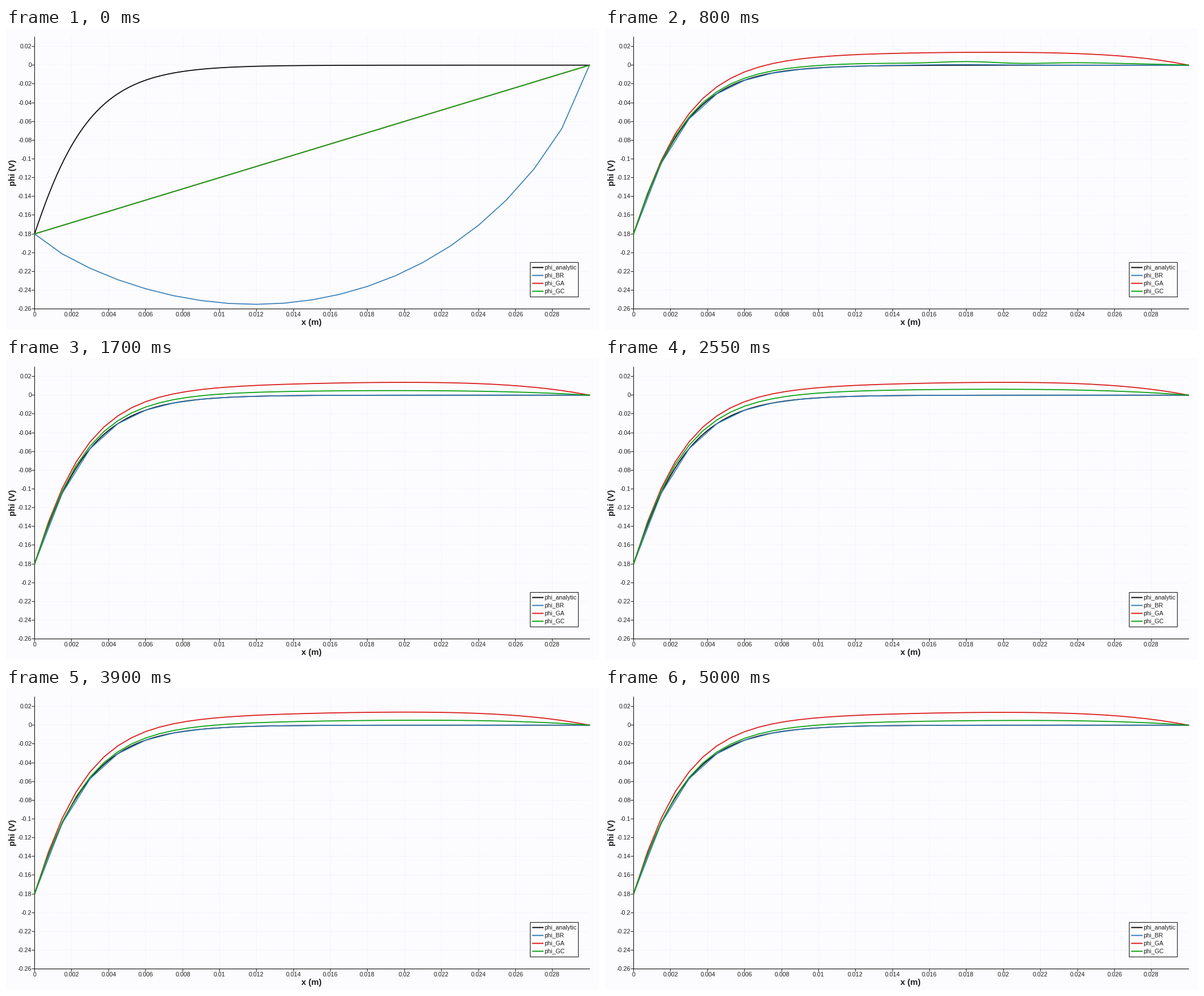
Recreate the animation shown at these times as a matplotlib script. Size 1048 px wide and 534 px high, loop 5050 ms.

```python
import numpy as np
import matplotlib.pyplot as plt
from matplotlib.animation import FuncAnimation
from matplotlib.patches import Rectangle

W, H, DPI = 1048, 534, 100
FRAMES, STEP = 101, 50
PT = 72 / DPI  # points per pixel
LENGTH, WALL = 0.03, -0.18
BLACK, BLUE, RED, GREEN = "#0c0c10", "#377eb8", "#dc1c1c", "#0aa314"
INK, GRID = "#1c1c1c", "#eaeaf9"

plt.rcParams["font.family"] = "Liberation Sans"
fig = plt.figure(figsize=(W / DPI, H / DPI), dpi=DPI, facecolor="#fcfcfe")
ax = fig.add_axes([0, 0, 1, 1])
ax.set(xlim=(0, W), ylim=(H, 0))
ax.axis("off")


def px(x):
    return 50.5 + x * 32690


def py(phi):
    return 65.7 - phi * 1657.7


def line(xs, ys, color=INK, width=1.0, **kw):
    return ax.plot(xs, ys, color=color, lw=width * PT, snap=False, **kw)[0]


def label(x, y, s, size=10.8, **kw):
    ax.text(x, y, s, fontsize=size * PT, color=INK, **kw)


def tick_text(v):
    return f"{v:.3f}".rstrip("0").rstrip(".") if v else "0"


def analytic(x):
    return -0.2205 * np.exp(-x / 0.0023) + 0.0405 * np.exp(-x / 0.0011)


def xlogx(v):
    return v * np.log(v + 1e-12)


def excess(u, jump, reach, rise, power, drop):
    """Offset in volts: a quick jump at the wall, a slow rise, zero at the far end."""
    return 1e-3 * (jump * (1 - np.exp(-u / reach)) + rise * u**power) * (1 - u**drop)


u20, u40 = np.linspace(0, 1, 21), np.linspace(0, 1, 41)
exact20, exact40 = analytic(u20 * LENGTH), analytic(u40 * LENGTH)
ramp = WALL * (1 - u40)
sag = WALL * (1 - u20) - 1e-3 * (
    55 * u20 * (1 - u20) - 352 * xlogx(1 - u20) - 71 * xlogx(u20))


def phi_br(early):
    return exact20 + 0.9e-3 * early * np.exp(-((u20 - 0.58) / 0.13) ** 2)


def phi_ga(t, early):
    rise = 12.6 + 0.8 * np.exp(-((t - 3500) / 500) ** 2)
    late = excess(u40, 6.6, 0.04, rise, 1, 6)
    first = excess(u40, 13.5, 0.2, 2, 1, 8)
    return exact40 + late + early * (first - late)


def phi_gc(t, early):
    jump = np.interp(t, [800, 2550, 3200, 5000], [2, 3.6, 1.7, 1.2])
    rise = np.interp(t, [800, 1700, 3200], [3, 6, 9.3])
    ripple = np.cos(8 * np.pi * (u40 - 0.59)) * np.exp(-((u40 - 0.66) / 0.15) ** 2)
    return exact40 + excess(u40, jump, 0.03, rise, 1.5, 4) + 1.4e-3 * early * ripple * (1 - u40**4)


# Grid, axes and tick labels
dots = dict(linestyle=(0, (1.5, 2)), zorder=0)
for n in range(15):
    v = n * 0.002
    x = np.floor(px(v)) + 0.5
    if n:
        line([x, x], [17, 496], GRID, **dots)
    line([x, x], [497, 501])
    label(x, 509.5, tick_text(v), ha="center")
for n in range(-13, 2):
    v = n * 0.02
    y = np.floor(py(v)) + 0.5
    if n > -13:
        line([51, 1031], [y, y], GRID, **dots)
    line([46, 50], [y, y])
    label(45.5, y + 3.7, tick_text(v), ha="right")
line([50.5, 50.5], [16, 497], width=1.2)
line([50, 1031.5], [496.7, 496.7], width=1.2)
label(540, 525.5, "x (m)", 15, weight="bold", ha="center")
label(12, 256, "phi (V)", 15, weight="bold", ha="center", va="center", rotation=90)

# Curves
dense = np.linspace(0, LENGTH, 301)
line(px(dense), py(analytic(dense)), BLACK, 1.8, zorder=3)
br = line([], [], BLUE, 1.7, zorder=4)
ga = line([], [], RED, 1.8, zorder=5)
gc = line([], [], GREEN, 1.8, zorder=6)

# Legend
ax.add_patch(Rectangle((926.5, 414.5), 85, 61, fc="#fdfdfe", ec=INK,
                       lw=1.1 * PT, snap=False, zorder=7))
for n, (name, color) in enumerate([("analytic", BLACK), ("BR", BLUE), ("GA", RED), ("GC", GREEN)]):
    y = 423.5 + 14 * n
    line([931, 949], [y, y], color, 2, zorder=8)
    label(951, y + 3.2, "phi_" + name, 10.6, zorder=8)


def update(n):
    t = n * STEP
    start = np.exp(-t / 110)  # weight of the initial guess
    early = np.clip((1700 - t) / 900, 0, 1)
    for curve, u, guess, phi in (
            (br, u20, sag, phi_br(early)),
            (ga, u40, ramp, phi_ga(t, early)),
            (gc, u40, ramp, phi_gc(t, early))):
        curve.set_data(px(u * LENGTH), py(phi + start * (guess - phi)))
    return br, ga, gc


anim = FuncAnimation(fig, update, frames=FRAMES, interval=STEP, repeat=True, repeat_delay=0)
plt.show()
```
